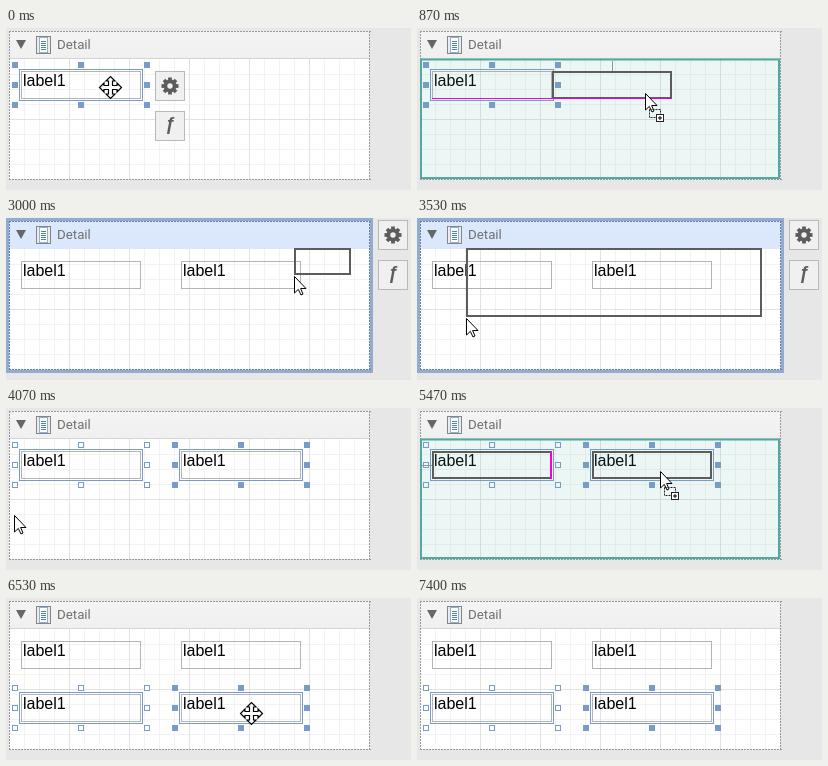
Write an HTML page with a canvas that moves like this. It is 405x162 px and loops after 8390 ms.

```html
<!DOCTYPE html>
<html lang="en">
<head>
<meta charset="utf-8">
<title>Report band designer</title>
<style>
html, body { margin: 0; width: 100%; height: 100%; overflow: hidden; background: #e7e7e7; }
canvas { display: block; }
</style>
</head>
<body>
<canvas id="stage" width="405" height="162"></canvas>
<script>
const ctx = document.getElementById('stage').getContext('2d');
const LOOP = 8390, STEP = 1000 / 15;
const BLUE = '#7a9bc8', DARK = '#5c5c5c', TEAL = '#50aaa0', PINK = '#f000e0';
const W = 120, H = 28, LEFT = 15, TOP = 43, COL = 160, ROW = 53;

// When the picture switches state
const DRAG = 530, DROP = 1460, PICK_BAND = 2460, MARQUEE = 2730;
const PICK_BOTH = 4060, DRAG_BOTH = 5460, DROP_BOTH = 6460;

// Pointer moves: from and to in ms, destination, strength of the ease-out
const ORIGIN = { x: 104, y: 59 };
const MOVES = [
  { from: 0, to: 133, x: 100, y: 59, ease: 1 },
  { from: 467, to: 1400, x: 260, y: 67, ease: 2.9 },
  { from: 1667, to: 2067, x: 344, y: 29, ease: 1.3 },
  { from: 2667, to: 3000, x: 288, y: 58, ease: 1 },
  { from: 3000, to: 3867, x: 8, y: 107, ease: 2 },
  { from: 4267, to: 4667, x: 243, y: 63, ease: 1.3 },
  { from: 5467, to: 6133, x: 245, y: 115, ease: 1.6 },
  { from: 7067, to: 7400, x: 158, y: 164, ease: 1 }
];

function pointer(t) {
  let last = ORIGIN;
  for (const m of MOVES) {
    if (t < m.from) return last;
    if (t < m.to) {
      const k = 1 - (1 - (t - m.from) / (m.to - m.from)) ** m.ease;
      return { x: Math.round(last.x + (m.x - last.x) * k), y: Math.round(last.y + (m.y - last.y) * k) };
    }
    last = m;
  }
  return null;
}

const within = (t, a, b) => t >= a && t < b;
const snap = (v, target) => Math.abs(v - target) <= 8 ? target : v;
const place = n => [LEFT + n % 2 * COL, TOP + (n >> 1) * ROW];

function fill(x, y, w, h, color) {
  ctx.fillStyle = color;
  ctx.fillRect(x, y, w, h);
}

function box(x, y, w, h, color, line = 1) {
  ctx.strokeStyle = color;
  ctx.lineWidth = line;
  ctx.strokeRect(x + line / 2, y + line / 2, w - line, h - line);
}

function dotted(x, y, w, h, color) {
  for (let i = 0; i < Math.max(w, h); i += 3) {
    fill(w > h ? x + i : x, w > h ? y : y + i, Math.min(w, 2), Math.min(h, 2), color);
  }
}

function text(s, x, y, font, color) {
  ctx.fillStyle = color;
  ctx.font = font;
  ctx.fillText(s, x, y);
}

function shape(points, color, outline, line = 1) {
  ctx.beginPath();
  points.forEach(([x, y]) => ctx.lineTo(x, y));
  ctx.closePath();
  ctx.fillStyle = color;
  ctx.fill();
  if (outline) {
    ctx.strokeStyle = outline;
    ctx.lineWidth = line;
    ctx.stroke();
  }
}

function at(x, y, draw) {
  ctx.save();
  ctx.translate(x, y);
  draw();
  ctx.restore();
}

function grid() {
  fill(3, 31, 360, 120, '#fff');
  for (const [gap, color] of [[15, '#f2f2f2'], [60, '#e2e2e2']]) {
    for (let x = 3 + gap; x < 363; x += gap) fill(x, 31, 1, 120, color);
    for (let y = 31 + gap; y < 151; y += gap) fill(3, y, 360, 1, color);
  }
}

function bandIcon() {
  fill(0, 0, 15, 18, '#858585');
  fill(1, 1, 13, 16, '#ececec');
  fill(3, 1, 9, 16, '#fff');
  box(3, 1, 9, 16, '#8fb0d4');
  for (let y = 5; y < 14; y += 2) fill(5, y, 5, 1, '#4b82bd');
}

function header(selected) {
  const g = ctx.createLinearGradient(0, 3, 0, 30);
  g.addColorStop(0, selected ? '#dce8fc' : '#f4f4f4');
  g.addColorStop(1, selected ? '#dbe7fb' : '#f0f0f0');
  fill(3, 3, 360, 28, g);
  shape([[10, 12], [20, 12], [15, 21]], '#666');
  at(30, 8, bandIcon);
  text('Detail', 51, 21, '13.3px Roboto, "Open Sans", sans-serif', '#707070');
}

function bandFrame(selected) {
  if (selected) box(0, 0, 367, 155, '#94abd1', 3);
  const color = selected ? '#5f7fae' : '#999';
  for (const y of [3, 151]) dotted(3, y, 361, 1, color);
  for (const x of [3, 363]) dotted(x, 3, 1, 149, color);
  if (!selected) fill(4, 30, 359, 1, '#d4d4d4');
}

function label(n) {
  const [x, y] = place(n);
  box(x, y, W, H, '#b4b4b4');
  text('label1', x + 2, y + 15, '16px "Liberation Sans", Arial, sans-serif', '#000');
}

function selection(n, hollow) {
  const [x, y] = place(n);
  box(x - 2, y - 2, W + 4, H + 4, BLUE);
  for (let i = 0; i < 9; i++) {
    if (i === 4) continue;
    const hx = x - 9 + i % 3 * (W / 2 + 6), hy = y - 9 + Math.floor(i / 3) * (H / 2 + 6);
    fill(hx, hy, 6, 6, hollow ? '#fff' : BLUE);
    box(hx, hy, 6, 6, BLUE);
  }
}

function gear() {
  ctx.fillStyle = DARK;
  for (let i = 0; i < 4; i++) {
    ctx.fillRect(-1.9, -8.5, 3.8, 17);
    ctx.rotate(Math.PI / 4);
  }
  for (const [r, color] of [[6.5, DARK], [2.7, '#f0f0f0']]) {
    ctx.beginPath();
    ctx.arc(0, 0, r, 0, 7);
    ctx.fillStyle = color;
    ctx.fill();
  }
}

function formula() {
  ctx.textAlign = 'center';
  text('ƒ', 0, 4, 'italic bold 18px "Liberation Sans", Arial, sans-serif', DARK);
}

function buttons(x, y) {
  for (const icon of [gear, formula]) {
    fill(x, y, 30, 30, '#f0f0f0');
    box(x, y, 30, 30, '#b9b9b9');
    at(x + 15, y + 15, icon);
    y += 40;
  }
}

function arrowCursor() {
  shape([[.5, .5], [.5, 17], [4.3, 13.4], [7, 19], [9, 18], [6.6, 12.5], [12, 12.5]], '#fff', '#000');
}

function copyCursor() {
  arrowCursor();
  ctx.setLineDash([2, 1]);
  box(4, 16, 12, 9, '#222');
  ctx.setLineDash([]);
  fill(11, 21, 8, 8, '#fff');
  box(11, 21, 8, 8, '#222');
  fill(13, 24.5, 4, 1, '#000');
  fill(14.5, 23, 1, 4, '#000');
}

function moveCursor() {
  const arm = [[-2, -2], [-2, -6.5], [-4.5, -6.5], [0, -11], [4.5, -6.5], [2, -6.5]];
  const points = [];
  for (let i = 0; i < 4; i++) {
    const c = Math.cos(i * Math.PI / 2), s = Math.sin(i * Math.PI / 2);
    for (const [x, y] of arm) points.push([x * c - y * s + .5, x * s + y * c + .5]);
  }
  shape(points, '#fff', '#000', 1.2);
}

function dropArea() {
  fill(3, 31, 360, 120, 'rgba(80, 170, 160, .11)');
  box(3, 30.5, 360, 120.5, TEAL, 2);
}

function dragAcross(x) {
  const gx = snap(snap(x - 85, LEFT), LEFT + W);
  fill(gx + W / 2, 33, 1, 10, '#8a9a9a');
  box(gx, TOP, W, H, DARK, 2);
  fill(LEFT, TOP + H - 1, gx + W - LEFT, 1, PINK);
}

function dragDown(y) {
  const gy = snap(y - 20, TOP + H);
  fill(5, gy + H / 2, 10, 1, '#8a9a9a');
  for (const x of [LEFT, LEFT + COL]) box(x, gy, W, H, DARK, 2);
  fill(LEFT + W - 2, TOP, 2, gy + H - TOP, PINK);
}

function isOver(n, pos) {
  const [x, y] = place(n);
  return within(pos.x, x, x + W) && within(pos.y, y, y + H);
}

function scene(t) {
  const bandSelected = within(t, PICK_BAND, PICK_BOTH);
  const across = within(t, DRAG, DROP), down = within(t, DRAG_BOTH, DROP_BOTH);
  const count = t < DROP ? 1 : t < DROP_BOTH ? 2 : 4;
  const chosen = t < DROP ? [0] : t < PICK_BAND ? [1] : bandSelected ? [] : t < DROP_BOTH ? [0, 1] : [2, 3];
  const pos = pointer(t);

  fill(0, 0, 405, 162, '#e7e7e7');
  grid();
  header(bandSelected);
  bandFrame(bandSelected);
  for (let n = 0; n < count; n++) label(n);
  chosen.forEach((n, i) => selection(n, i < chosen.length - 1));

  if (bandSelected) buttons(372, 2);
  else if (t < DRAG) buttons(LEFT + 134, TOP);
  else if (within(t, DROP, PICK_BAND)) buttons(LEFT + COL + 134, TOP);

  if (across || down) dropArea();
  if (across) dragAcross(pos.x);
  if (down) dragDown(pos.y);
  if (within(t, MARQUEE, PICK_BOTH)) box(pos.x, 30, 345 - pos.x, Math.max(2, pos.y - 31), DARK, 2);

  if (!pos) return;
  const over = chosen.some(n => isOver(n, pos));
  at(pos.x, pos.y, across || down ? copyCursor : over ? moveCursor : arrowCursor);
}

const start = performance.now();
function tick() {
  const t = (performance.now() - start) % LOOP;
  scene(Math.floor((t + 4) / STEP) * STEP);
  requestAnimationFrame(tick);
}
tick();
</script>
</body>
</html>
```
